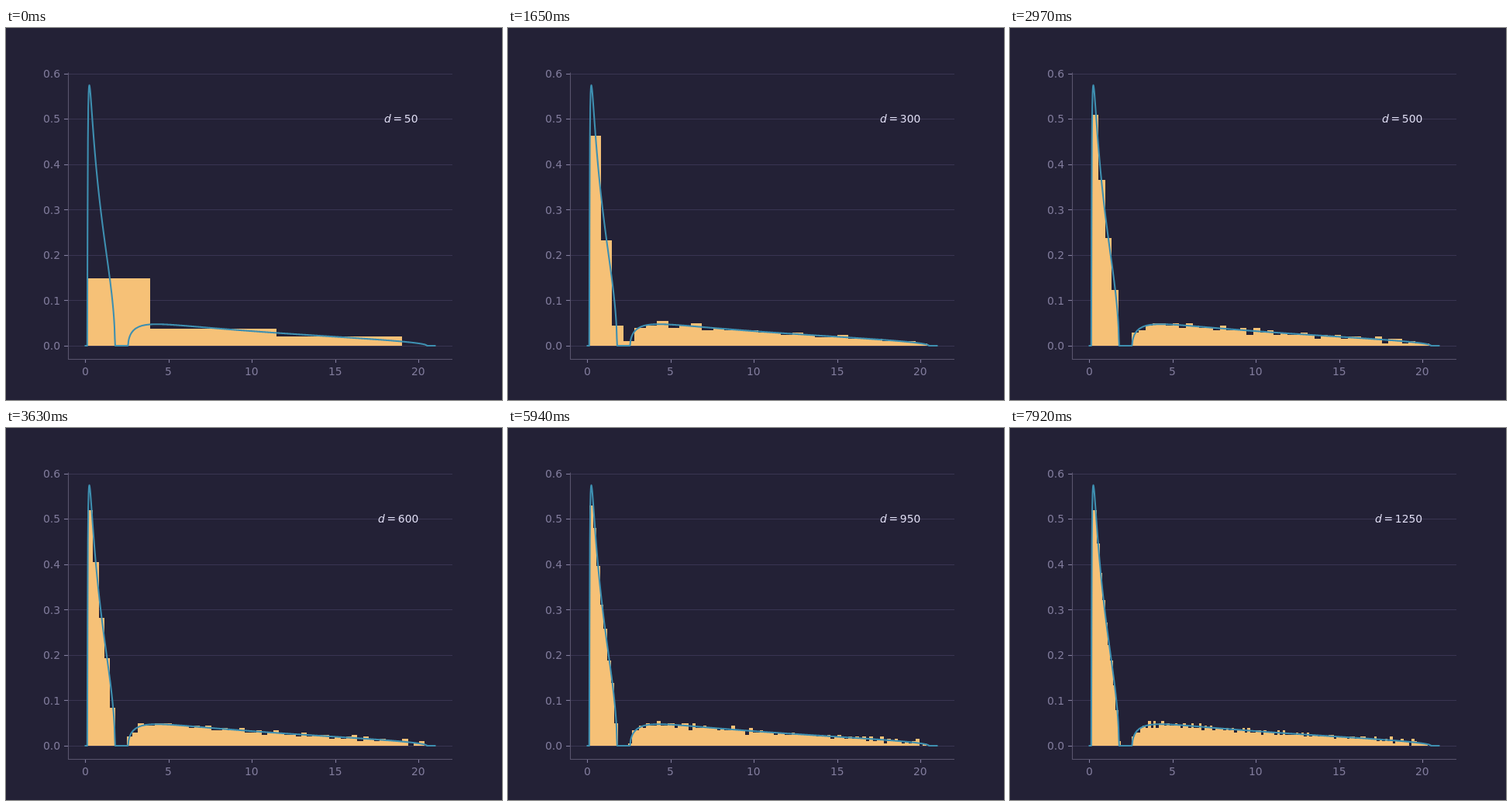
An HTML page with a canvas for the animation above (8000 ms loop, 640 by 480 pixels).

```html
<!DOCTYPE html>
<html lang="en">
<head>
<meta charset="utf-8">
<title>Eigenvalue histogram</title>
<style>
  html, body { margin: 0; width: 100%; height: 100%; overflow: hidden; background: #232136; }
  canvas { display: block; width: 640px; height: 480px; }
</style>
</head>
<body>
<canvas id="stage" width="640" height="480"></canvas>
<script>
const ctx = document.getElementById('stage').getContext('2d');
const LOOP = 8000, STEP = 330, STEPS = Math.ceil(LOOP / STEP);
const COLOR = {
  base: '#232136', grid: '#393552', spine: '#59546d',
  label: '#817c9c', text: '#e0def4', bar: '#f6c177', line: '#3e8fb0'
};
const FONT = '13.89px "DejaVu Sans", sans-serif';
const OBLIQUE = 'italic ' + FONT;

// Plot area and data-to-pixel scales
const LEFT = 80, RIGHT = 576, TOP = 57.6, BOTTOM = 427.2;
const X0 = 102.33, XS = 21.482, Y0 = 410.05, YS = 585.8;
const px = x => X0 + x * XS;
const py = y => Y0 - y * YS;
const snap = v => Math.floor(v + 0.5) + 0.5;

// Limiting spectral density for population eigenvalues 1 and 9 in equal
// parts, aspect ratio 1/2: the complex root pair of a cubic in u.
function density(x) {
  if (x <= 0) return 0;
  const a = -(7.5 + x), b = 4.5 + 10 * x, c = -9 * x;
  const p = b - a * a / 3;
  const q = 2 * a ** 3 / 27 - a * b / 3 + c;
  const disc = q * q / 4 + p ** 3 / 27;
  if (disc <= 0) return 0;
  const s = Math.sqrt(disc);
  const real = Math.cbrt(-q / 2 + s) + Math.cbrt(-q / 2 - s) - a / 3;
  const norm = -c / real, re = (-a - real) / 2;
  return 2 / Math.PI * Math.sqrt(Math.max(0, norm - re * re)) / norm;
}

const DX = 0.005, CELLS = 4200;
const cumulative = [0];
for (let i = 0; i < CELLS; i++) {
  cumulative.push(cumulative[i] + density((i + 0.5) * DX) * DX);
}
function cdf(x) {
  const t = Math.min(Math.max(x / DX, 0), CELLS - 0.001), i = Math.floor(t);
  const v = cumulative[i] + (cumulative[i + 1] - cumulative[i]) * (t - i);
  return v / cumulative[CELLS];
}

function random(seed) {
  return () => {
    seed = (seed + 0x6d2b79f5) | 0;
    let t = Math.imul(seed ^ (seed >>> 15), 1 | seed);
    t = (t + Math.imul(t ^ (t >>> 7), 61 | t)) ^ t;
    return ((t ^ (t >>> 14)) >>> 0) / 4294967296;
  };
}

// Smallest eigenvalue, and key points [d, largest eigenvalue]
const MIN = 0.131;
const MAX_KEYS = [[50, 19.02], [200, 19.3], [300, 20.42], [1250, 20.33]];
function largest(d) {
  const i = MAX_KEYS.findIndex(key => d <= key[0]);
  if (i === 0) return MAX_KEYS[0][1];
  const [d0, x0] = MAX_KEYS[i - 1], [d1, x1] = MAX_KEYS[i];
  return x0 + (x1 - x0) * (d - d0) / (d1 - d0);
}

// Eigenvalues repel each other, so the counts stay within about one of
// the expected cumulative number.
function histogram(d) {
  const bins = d / 10, width = (largest(d) - MIN) / bins;
  const rnd = random(d);
  const bars = [];
  let total = 0;
  for (let i = 0; i < bins; i++) {
    const x = MIN + i * width, end = x + width;
    const noise = density(end) > 0 ? (rnd() - 0.5) * 1.6 : 0;
    const target = i === bins - 1 ? d : Math.min(d - 1, Math.round(d * cdf(end) + noise));
    const count = Math.max(0, target - total);
    total += count;
    bars.push({
      left: Math.round(px(x)),
      right: Math.round(px(end)),
      top: Math.round(py(count / (d * width)))
    });
  }
  return bars;
}
const sizes = Array.from({ length: STEPS }, (_, i) => 50 * (i + 1));
const histograms = sizes.map(histogram);

const curve = new Path2D();
for (let i = 0; i < 1000; i++) {
  const x = 0.01 + 20.99 * i / 999;
  curve.lineTo(px(x), py(density(x)));
}

function segment(x1, y1, x2, y2, color) {
  ctx.strokeStyle = color;
  ctx.lineWidth = 1.11;
  ctx.beginPath();
  ctx.moveTo(x1, y1);
  ctx.lineTo(x2, y2);
  ctx.stroke();
}

// Draws text from x and returns its right end
function write(str, x, y, color, font = FONT) {
  ctx.font = font;
  ctx.fillStyle = color;
  ctx.fillText(str, x, y);
  return x + ctx.measureText(str).width;
}

// Axis label on whole pixels; align is 0.5 for centred, 1 for right
function label(str, x, y, align) {
  ctx.font = FONT;
  const left = x - ctx.measureText(str).width * align;
  write(str, Math.round(left), Math.round(y), COLOR.label);
}

function drawAxes() {
  for (let i = 0; i <= 6; i++) {
    const y = py(i / 10);
    segment(LEFT - 5, snap(y), LEFT, snap(y), COLOR.label);
    label((i / 10).toFixed(1), 70.3, y + 5.2, 1);
  }
  for (let x = 0; x <= 20; x += 5) {
    segment(snap(px(x)), 427, snap(px(x)), 432, COLOR.label);
    label(String(x), px(x), 448, 0.5);
  }
  segment(snap(LEFT), TOP, snap(LEFT), BOTTOM + 0.8, COLOR.spine);
  segment(LEFT, snap(BOTTOM), RIGHT, snap(BOTTOM), COLOR.spine);
}

function drawCaption(d) {
  const gap = 2.7, y = 122;
  ctx.font = FONT;
  const rest = ctx.measureText('=' + d).width;
  ctx.font = OBLIQUE;
  const width = ctx.measureText('d').width + rest + 2 * gap;
  let x = Math.round(px(20) - width);
  x = write('d', x, y, COLOR.text, OBLIQUE) + gap;
  x = write('=', x, y, COLOR.text) + gap;
  write(String(d), x, y, COLOR.text);
}

function draw(step) {
  ctx.fillStyle = COLOR.base;
  ctx.fillRect(0, 0, 640, 480);
  for (let i = 0; i <= 6; i++) {
    const y = snap(py(i / 10));
    segment(LEFT, y, RIGHT, y, COLOR.grid);
  }
  ctx.fillStyle = COLOR.bar;
  for (const b of histograms[step]) {
    ctx.fillRect(b.left, b.top, b.right - b.left, Math.round(Y0) - b.top);
  }
  ctx.strokeStyle = COLOR.line;
  ctx.lineWidth = 2.08;
  ctx.lineJoin = 'round';
  ctx.lineCap = 'square';
  ctx.stroke(curve);
  ctx.lineCap = 'butt';
  drawAxes();
  drawCaption(sizes[step]);
}

const began = performance.now();
function tick() {
  const t = Math.max(0, performance.now() - began) % LOOP;
  draw(Math.floor(t / STEP));
  requestAnimationFrame(tick);
}
tick();
</script>
</body>
</html>
```
